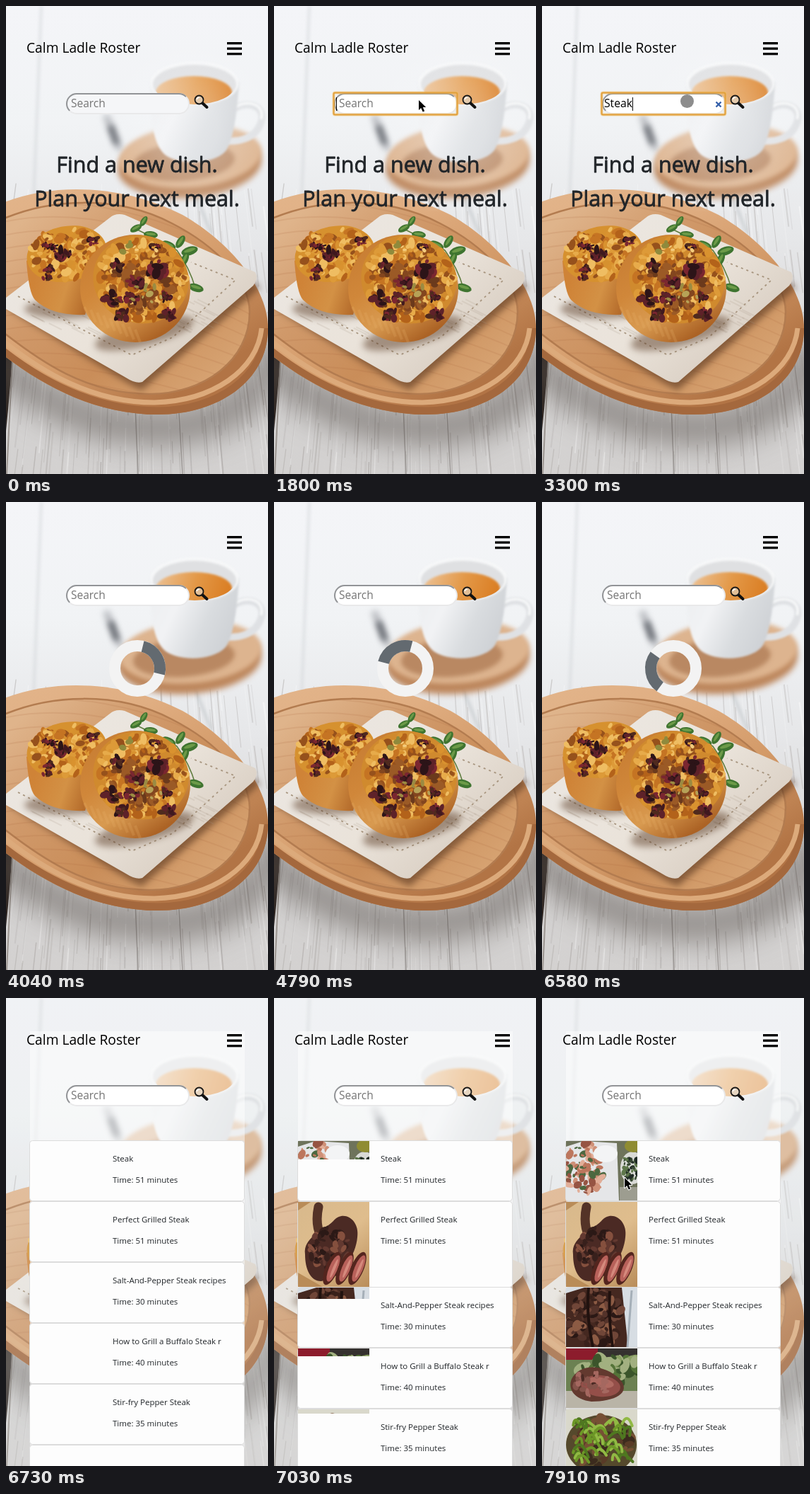
Animation of 371x661 px, one loop 8000 ms. Source, as an HTML page with a canvas:

```html
<!DOCTYPE html>
<html lang="en">
<head>
<meta charset="utf-8">
<title>Meal search</title>
<style>
html, body { margin: 0; width: 100%; height: 100%; overflow: hidden; background: #fff; }
canvas { display: block; }
</style>
</head>
<body>
<canvas id="stage" width="371" height="661"></canvas>
<script>
const W = 371, H = 661, LOOP = 8000, STEP = 149.2;
const stage = document.getElementById('stage').getContext('2d');
let ctx = stage;

function randomizer(seed) {
  return () => (seed = (seed * 16807) % 2147483647) / 2147483647;
}
function layer(w, h, draw) {
  const canvas = document.createElement('canvas');
  canvas.width = w;
  canvas.height = h;
  ctx = canvas.getContext('2d');
  draw();
  ctx = stage;
  return canvas;
}
function gradient(x0, y0, x1, y1, ...colors) {
  const g = ctx.createLinearGradient(x0, y0, x1, y1);
  colors.forEach((c, i) => g.addColorStop(i / (colors.length - 1), c));
  return g;
}
function rect(x, y, w, h, color) {
  ctx.fillStyle = color;
  ctx.fillRect(x, y, w, h);
}
function ellipse(x, y, rx, ry, color, angle = 0) {
  ctx.beginPath();
  ctx.ellipse(x, y, rx, ry, angle, 0, 7);
  ctx.fillStyle = color;
  ctx.fill();
}
function shape(d, color) {
  ctx.fillStyle = color;
  ctx.fill(new Path2D(d));
}
function line(d, color, width = 1, cap = 'butt') {
  ctx.strokeStyle = color;
  ctx.lineWidth = width;
  ctx.lineCap = cap;
  ctx.stroke(new Path2D(d));
}
function text(str, x, y, size, color = '#000', align = 'left') {
  ctx.font = `${size}px "Open Sans", "Noto Sans", sans-serif`;
  ctx.textAlign = align;
  ctx.fillStyle = color;
  ctx.fillText(str, x, y);
}
function heading(str, y) {
  text(str, 185.5, y, 30.5, '#212529', 'center');
  ctx.strokeStyle = '#212529';
  ctx.lineWidth = .8;
  ctx.lineJoin = 'round';
  ctx.strokeText(str, 185.5, y);
}
// Scatters small irregular crumbs inside an ellipse.
function crumbs(x, y, rx, ry, count, size, colors, seed) {
  const rnd = randomizer(seed);
  for (let i = 0; i < count; i++) {
    const a = rnd() * 6.283, r = Math.sqrt(rnd()), s = size * (0.5 + rnd());
    ellipse(x + Math.cos(a) * r * rx, y + Math.sin(a) * r * ry, s, s * (0.4 + rnd() * 0.4),
      colors[Math.floor(rnd() * colors.length)], rnd() * 3.14);
  }
}
function berries(points) {
  for (const [x, y, r] of points) {
    crumbs(x, y, r, r * .7, 16, r * .4, ['#40191f', '#5e2229', '#2c1418', '#7a2630', '#4f2a1e'], x * y);
  }
}

function table() {
  rect(0, 0, W, H, gradient(0, 0, 0, H, '#f4f5f8', '#f1f3f5', '#e6e7e9', '#d6d5d5', '#d3d1d0'));
  const rnd = randomizer(71);
  for (let i = 0; i < 320; i++) {
    const x = rnd() * W, y = 250 + rnd() * 400, len = 30 + rnd() * 90;
    const lean = (x - 185) / 1300;
    const tone = rnd() < 0.45 ? '255,255,255' : '135,129,125';
    line(`M${x} ${y}l${lean * len} ${len}`, `rgba(${tone},${0.1 + rnd() * 0.25})`, 0.7 + rnd() * 1.6);
  }
  ctx.filter = 'blur(2px)';
  line('M50 0L39 275', 'rgba(205,208,212,.6)', 3);
  line('M262 250L290 320', 'rgba(180,185,190,.5)', 4);
  ctx.filter = 'none';
  line('M183 565L187 661M245 575L250 661', '#a09c9a', 1.5);
  shape('M0 490L9 499L3 570L0 600Z', '#2f2622');
  line('M9 500L1 661', '#9b9590', 2);
}

function teacup() {
  ctx.filter = 'blur(4px)';
  line('M143 158L160 200', 'rgba(175,178,183,.8)', 10, 'round');
  line('M149 172L156 192', '#60646b', 8, 'round');
  ellipse(260, 224, 102, 47, '#bd875d', -0.08);
  ctx.filter = 'blur(3px)';
  ellipse(261, 212, 101, 44, '#ddb48f', -0.08);
  ellipse(252, 220, 72, 27, '#b98862', -0.08);
  ctx.filter = 'blur(1.5px)';
  line('M323 145C348 132 368 145 361 165C353 187 330 193 308 190', '#dfe1e4', 10);
  line('M323 143C348 130 367 142 361 160', '#f6f7f8', 4);
  shape('M204 107C205 155 206 188 222 207C238 225 292 226 311 205C324 186 328 140 330 107Z',
    gradient(204, 120, 329, 180, '#eceef0', '#f1f2f4', '#d9dcdf', '#cdd0d4'));
  ellipse(267, 109, 63, 31, '#f6f7f8');
  ellipse(267, 111, 59, 28, '#dfe0e2');
  ctx.save();
  ctx.beginPath();
  ctx.ellipse(267, 111, 58, 28, 0, 0, 7);
  ctx.clip();
  ellipse(266, 122, 54, 23, gradient(210, 100, 325, 135, '#ecc49a', '#e39847', '#d8781c'));
  ctx.restore();
  ctx.filter = 'none';
}

function tray() {
  const outer = 'M-20 285C60 245 170 253 250 295C320 335 371 400 371 455C371 530 300 577 215 577C120 577 40 530 -20 480Z';
  const inner = 'M-20 308C60 268 160 268 235 307C300 340 345 390 345 432C345 500 280 548 204 548C115 548 50 505 -20 448Z';
  ctx.filter = 'blur(20px)';
  line('M-30 490C70 575 140 598 225 596C310 594 375 545 385 470', 'rgba(88,80,76,.55)', 48);
  ctx.filter = 'none';
  shape(outer, gradient(0, 265, 200, 577, '#e2b48a', '#e0ae82', '#d39a68', '#b27445'));
  ctx.save();
  ctx.clip(new Path2D(outer));
  line('M-20 476C40 526 120 572 215 573C300 572 367 526 370 455', '#a4683d', 13);
  line('M-20 460C50 520 125 560 210 560C292 558 356 515 362 455', '#dcaa7b', 7);
  ctx.restore();
  shape(inner, gradient(40, 290, 260, 550, '#dfb48b', '#d0996a', '#c98d59', '#d6a271'));
  line(inner, '#b37c50', 2.5);
  ctx.save();
  ctx.clip(new Path2D(inner));
  for (let i = 0; i < 16; i++) {
    line(`M-20 ${290 + i * 19}C90 ${260 + i * 19} 240 ${290 + i * 21} 370 ${385 + i * 16}`, 'rgba(165,105,60,.15)', 2);
  }
  ctx.restore();
}

function napkin() {
  ctx.filter = 'blur(5px)';
  shape('M0 426L176 535L192 543L360 398L340 380Z', 'rgba(85,52,30,.6)');
  ctx.filter = 'none';
  shape('M0 412L147 299Q155 292 168 295L353 376Q358 385 350 395L193 531Q184 534 170 525L0 428Z',
    gradient(90, 330, 260, 520, '#ebe6e0', '#eae3da', '#d8cdc1'));
  const rnd = randomizer(12);
  for (let i = 0; i < 60; i++) {
    const x = 35 + rnd() * 250, y = 410 + rnd() * 45;
    line(`M${x} ${y}l18 9`, 'rgba(165,148,132,.18)', 2);
  }
  ctx.setLineDash([3, 5]);
  line('M17 410L178 493L236 468L325 387L262 362', '#a7957f', 1.8);
  ctx.setLineDash([]);
}

function leaves() {
  line('M180 313Q215 330 242 345Q260 370 268 398', '#5c7a3c', 1.5);
  const sprigs = [[184, 314, 9, -.5], [195, 304, 8, -1], [205, 323, 10, .1], [230, 338, 11, .4],
    [247, 333, 10, -1], [260, 346, 12, -.3], [253, 358, 10, 2], [269, 398, 11, .3]];
  for (const [x, y, r, angle] of sprigs) {
    ellipse(x, y, r, r * 0.5, '#3f7430', angle);
    ellipse(x, y - 1, r * 0.7, r * 0.2, '#6c9a48', angle);
  }
}

function muffins() {
  const gold = ['#d9922f', '#e7ab4a', '#c57423', '#efbd62', '#dd9a38', '#b3621a', '#96511c'];
  ctx.filter = 'blur(5px)';
  ellipse(84, 428, 58, 14, 'rgba(95,65,42,.5)');
  ellipse(196, 462, 72, 18, 'rgba(95,65,42,.5)', -.25);
  ctx.filter = 'none';
  shape('M29 360Q32 405 41 415Q65 438 112 436L142 345L90 312Z',
    gradient(35, 400, 125, 430, '#cf8337', '#d39145', '#a95d21'));
  ellipse(86, 350, 57, 39, '#d6912f', -.2);
  crumbs(86, 350, 52, 35, 150, 5.5, gold, 33);
  berries([[78, 351, 12], [67, 340, 6], [56, 339, 6], [124, 331, 8], [60, 372, 7], [58, 383, 6]]);
  ellipse(183, 399, 78, 76, gradient(120, 350, 200, 475, '#c97f34', '#d0873a', '#d89a50', '#ac6325'));
  for (let i = 0; i < 9; i++) line(`M${111 + i * 9} ${425 + i * 4}l7 18`, 'rgba(235,180,110,.2)', 4);
  ellipse(191, 386, 68, 62, '#d08a2e', .25);
  crumbs(191, 385, 62, 57, 260, 6.5, gold, 91);
  crumbs(190, 400, 46, 36, 45, 6, ['#6b3a1c', '#83461f', '#9b5a26'], 37);
  berries([[159, 365, 10], [184, 390, 11], [216, 371, 15], [210, 340, 7], [152, 413, 13], [164, 436, 10],
    [178, 412, 10], [225, 411, 9], [229, 436, 11]]);
  crumbs(196, 405, 35, 20, 10, 4, ['#9b8b42', '#b6a257'], 8);
  crumbs(185, 345, 28, 12, 6, 4, ['#8f8a3c', '#f3cb7c'], 15);
}

const photo = layer(W, H, () => { table(); teacup(); tray(); napkin(); leaves(); muffins(); });

const dishes = [
  { name: 'Steak', time: 51, h: 84, loaded: .31, paint() {
    rect(0, 0, 101, 84, '#6e735b');
    shape('M0 8L25 0L72 3L75 84L0 84Z', '#e5e6e8');
    crumbs(24, 38, 30, 36, 90, 5, ['#bd765d', '#cf9077', '#965443', '#e2ae98', '#4c6840'], 4);
    ellipse(56, 18, 17, 12, '#f3f4f5');
    ellipse(94, 38, 17, 23, '#d9dad6');
    crumbs(92, 38, 12, 18, 45, 3, ['#384933', '#5e774b', '#202b25'], 7);
    rect(76, 65, 25, 19, '#9d9d90');
    ellipse(95, 7, 12, 9, '#8f8c32');
  } },
  { name: 'Perfect Grilled Steak', time: 51, h: 120, loaded: 1, paint() {
    rect(0, 0, 101, 120, gradient(0, 0, 101, 120, '#d8b98c', '#dfbd8d', '#b98d5a'));
    shape('M0 12L18 0H0ZM0 100L35 120H0Z', '#b98c58');
    line('M29 7Q24 30 32 48', '#543327', 13, 'round');
    shape('M10 74C7 50 35 42 50 27C64 10 88 25 84 50C82 75 62 106 33 112C17 112 10 94 10 74Z', '#4b2a24');
    crumbs(45, 68, 28, 34, 75, 5, ['#38201c', '#633930', '#85503e', '#2b1916'], 9);
    for (const x of [48, 66, 84]) {
      ellipse(x, 94, 9, 25, '#54251e', .4);
      ellipse(x + 2, 94, 6, 20, '#b8615a', .4);
      ellipse(x + 3, 94, 2, 14, '#d58a7d', .4);
    }
  } },
  { name: 'Salt-And-Pepper Steak recipes', time: 30, h: 84, loaded: .19, paint() {
    rect(0, 0, 101, 84, '#d7dde3');
    shape('M0 8L26 0H79L88 84H0Z', '#452820');
    crumbs(42, 42, 40, 40, 120, 6, ['#2a1815', '#704638', '#8c5b44', '#54332a', '#3a211b'], 17);
    line('M32 0Q28 38 38 84M62 5Q60 45 66 84', '#21120f', 4);
    line('M93 4L87 84', '#a5afb8', 3);
  } },
  { name: 'How to Grill a Buffalo Steak r', time: 40, h: 84, loaded: .13, paint() {
    rect(0, 0, 101, 84, '#6c8152');
    rect(0, 0, 45, 16, '#8c1c2c');
    rect(45, 0, 56, 12, '#35312f');
    crumbs(65, 29, 42, 18, 55, 9, ['#547338', '#8ba064', '#3b552b', '#a2b080'], 19);
    rect(0, 60, 101, 24, '#b9b4a7');
    shape('M8 43C20 20 54 22 76 43C94 63 68 75 36 75C12 72 2 58 8 43Z', '#63392f');
    ellipse(49, 53, 28, 15, '#944f49', .1);
    ellipse(50, 48, 18, 7, '#af6a61', .2);
    crumbs(35, 50, 27, 18, 35, 4, ['#4b2a24', '#85534a', '#a56860'], 23);
  } },
  { name: 'Stir-fry Pepper Steak', time: 35, h: 84, loaded: .07, paint() {
    rect(0, 0, 101, 84, '#d9d8cb');
    ellipse(50, 50, 50, 42, '#55492c');
    crumbs(50, 48, 42, 35, 65, 7, ['#593b27', '#765034', '#3c2b1e'], 28);
    const rnd = randomizer(44);
    for (let i = 0; i < 36; i++) {
      const x = 10 + rnd() * 72, y = 18 + rnd() * 55;
      line(`M${x} ${y}q${rnd() * 16} -16 ${8 + rnd() * 12} ${rnd() * 12}`, ['#6d9727', '#91b944', '#4f7820'][i % 3], 4, 'round');
    }
  } }
];
for (const dish of dishes) dish.image = layer(101, dish.h, dish.paint);

function soften() {
  const g = ctx.createRadialGradient(260, 175, 40, 260, 175, 125);
  g.addColorStop(0, 'rgba(249,250,252,.3)');
  g.addColorStop(1, 'rgba(249,250,252,0)');
  rect(30, 47, 341, 243, g);
}

function searchBar(y, { value = '', focused = false, fill = '#fff' }) {
  const pill = new Path2D();
  pill.roundRect(86, y + 1, 173, 28, 14);
  ctx.fillStyle = fill;
  ctx.fill(pill);
  ctx.lineWidth = 2;
  ctx.strokeStyle = '#e9e9ea';
  ctx.stroke(pill);
  ctx.save();
  ctx.clip(new Path2D(`M84 ${y - 1}H261L245 ${y + 15}H100L84 ${y + 31}Z`));
  ctx.strokeStyle = '#929497';
  ctx.stroke(pill);
  ctx.restore();
  if (focused) {
    ctx.beginPath();
    ctx.roundRect(84.5, y - .5, 175, 31, 2);
    ctx.strokeStyle = 'rgba(240,190,100,.55)';
    ctx.lineWidth = 4;
    ctx.stroke();
    ctx.strokeStyle = '#e1a03c';
    ctx.lineWidth = 2;
    ctx.stroke();
  }
  if (value) text(value, 88, y + 20, 15.7);
  else text('Search', 92, y + 20, 15.5, '#757575');
  if (focused) rect(88 + (value ? ctx.measureText(value).width : 0), y + 6, 1, 19, '#000');
  if (value) line(`M246.5 ${y + 12.5}l7 7m0 -7l-7 7`, '#3560aa', 2.4);

  line(`M278 ${y + 14}l6.5 6`, '#111', 4, 'round');
  ellipse(273.5, y + 9.5, 6, 6, 'rgba(225,220,210,.6)');
  ctx.lineWidth = 1.8;
  ctx.strokeStyle = '#171717';
  ctx.stroke();
  line(`M270 ${y + 9}q1 -3 4 -3`, '#fff', 1.3);
}

function menu(y) {
  for (let i = 0; i < 3; i++) rect(313, y + i * 7.5, 21, 3.3, '#000');
}

function header(search) {
  text('Calm Ladle Roster', 29, 66, 19.2);
  menu(51);
  searchBar(123, search);
}

function pointer(x, y) {
  const arrow = `M${x} ${y}v14l3.2 -3l2.5 5.5l2.5 -1.1l-2.4 -5.3h4.4Z`;
  line(arrow, '#fff', 2);
  shape(arrow, '#000');
}

function home(t) {
  soften();
  const value = t < 2400 ? '' : 'Steak'.slice(0, Math.floor((t - 2400) / 150) + 1);
  const focused = t >= 1800;
  header({ value, focused, fill: focused ? '#fff' : '#f5f6f8' });
  heading('Find a new dish.', 235);
  heading('Plan your next meal.', 283);
  if (t >= 2400) ellipse(205.5, 134.5, 9.5, 9.5, '#8d8d8d');
  else if (t >= 750) pointer(205, 133);
  else if (t >= 600) pointer(208, 155);
  else if (t >= 450) pointer(216, 208);
}

function loading(t) {
  menu(48);
  searchBar(117, {});
  const frame = Math.floor(t / STEP);
  const middle = (240 + (frame - 32) * STEP / 990 * 360) * Math.PI / 180;
  const ring = (from, to, color) => {
    ctx.beginPath();
    ctx.arc(186, 235, 32, from, to);
    ctx.lineWidth = 16;
    ctx.lineCap = 'butt';
    ctx.strokeStyle = color;
    ctx.stroke();
  };
  ring(0, 2 * Math.PI, '#f3f3f3');
  ring(middle - Math.PI / 4, middle + Math.PI / 4, '#636a70');
}

function card(y, h) {
  ctx.beginPath();
  ctx.roundRect(33.5, y - .5, 304, h + 1, 4);
  ctx.fillStyle = '#fdfdfd';
  ctx.fill();
  ctx.lineWidth = 1;
  ctx.strokeStyle = '#dcdcdc';
  ctx.stroke();
}

function results(t) {
  rect(0, 0, W, H, 'rgba(225,227,230,.2)');
  rect(34, 47, 304, 614, 'rgba(255,255,255,.45)');
  header({});
  const step = Math.floor(t / STEP) - 47, started = t >= 7030;
  let y = 202;
  for (const { name, time, h, loaded, image } of dishes) {
    const height = started ? h : 84;
    card(y, height);
    if (started) {
      const shown = Math.round(h * Math.min(1, loaded + step * .25));
      ctx.drawImage(image, 0, 0, 101, shown, 34, y, 101, shown);
    }
    text(name, 151, y + 29, 11.5, '#212529');
    text(`Time: ${time} minutes`, 151, y + 59, 11.5, '#212529');
    y += height + (height === 120 ? 1 : 2);
  }
  if (y < H) card(y, 84);
  if (t >= 7910) pointer(117, 254);
  else if (t >= 7760) pointer(122, 268);
}

function render(now) {
  const t = now % LOOP;
  ctx.drawImage(photo, 0, 0);
  if (t < 3750) home(t);
  else if (t < 6730) loading(t);
  else results(t);
  requestAnimationFrame(render);
}
requestAnimationFrame(render);
</script>
</body>
</html>
```
